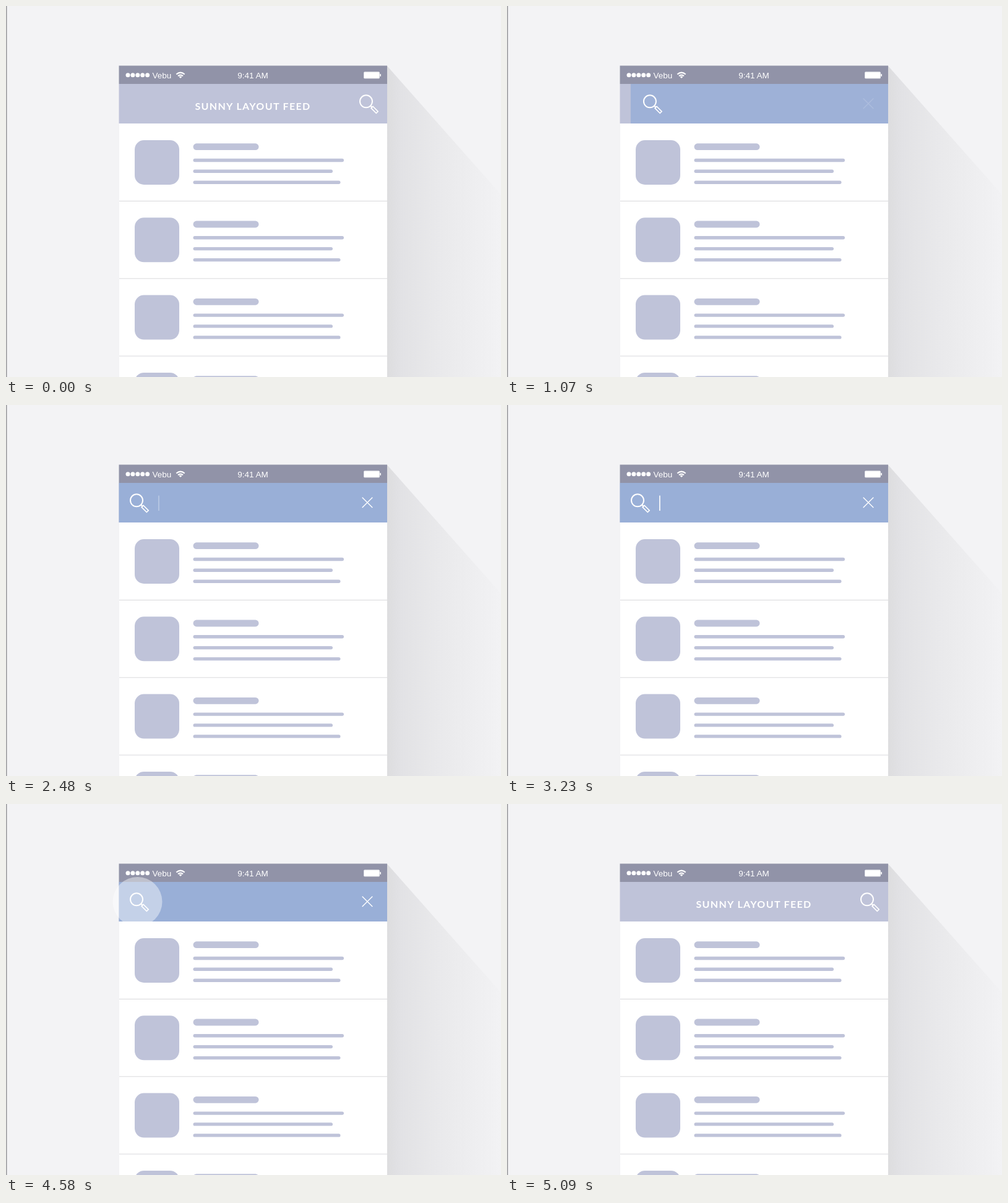
An HTML page that plays this animation: 800 px wide and 600 px high, repeating every 6.38 s.

```html
<!DOCTYPE html>
<html lang="en">
<head>
<meta charset="utf-8">
<title>Expanding search bar</title>
<style>
  html, body { margin: 0; width: 100%; height: 100%; overflow: hidden; background: #f3f3f5; }
  svg { display: block; width: 800px; height: 600px; }
  .status { font: 13.5px "Liberation Sans", Arial, sans-serif; }
  #title { font: bold 16px Lato, sans-serif; letter-spacing: 1.35px; }
</style>
</head>
<body>
<svg viewBox="0 0 800 600">
  <defs>
    <linearGradient id="shade">
      <stop offset="0" stop-color="#dddddf"/>
      <stop offset=".12" stop-color="#e2e2e5"/>
      <stop offset=".5" stop-color="#eaeaec"/>
      <stop offset="1" stop-color="#f2f2f4"/>
    </linearGradient>
    <g id="row">
      <rect x="208" y="217" width="72" height="72" rx="15"/>
      <rect x="302.5" y="222.3" width="106" height="10.8" rx="5.4"/>
      <rect x="302.5" y="246.8" width="243.5" height="5.4" rx="2.7"/>
      <rect x="302.5" y="264.6" width="225.5" height="5.4" rx="2.7"/>
      <rect x="302.5" y="282.6" width="238" height="5.4" rx="2.7"/>
      <rect x="183" y="315" width="433" height="1" fill="#d9d9dc"/>
    </g>
  </defs>

  <rect width="800" height="600" fill="#f3f3f5"/>
  <path d="M616 97L800 305V600H616Z" fill="url(#shade)"/>
  <rect width="1.5" height="600" fill="#98989b"/>

  <rect x="183" y="97" width="433" height="503" fill="#fff"/>
  <g id="list" fill="#bfc3d9"></g>

  <rect x="182.5" y="96.5" width="433.5" height="29.5" fill="#9193a8"/>
  <g class="status" fill="#fff">
    <g id="dots"></g>
    <text x="236.5" y="117">Vebu</text>
    <text x="399" y="117" text-anchor="middle">9:41 AM</text>
    <g fill="none" stroke="#fff" stroke-width="2">
      <path d="M275.3 110.6Q282 104.6 288.7 110.6M278 113.3Q282 109.7 286 113.3"/>
    </g>
    <path d="M279.6 114.5Q282 112.6 284.4 114.5L282 117Z"/>
    <rect x="578.5" y="106.8" width="25" height="10.2" rx="1" stroke="#e3e4ea"/>
    <rect x="604.3" y="109.8" width="1.7" height="4.2" rx=".8"/>
  </g>

  <rect x="182.5" y="126" width="433.5" height="64" fill="#bfc3d9"/>
  <rect id="bar" y="126" height="64" fill="#99afd7"/>
  <circle id="touch" fill="#fff"/>
  <text id="title" x="399" y="167.8" text-anchor="middle" fill="#fff">SUNNY LAYOUT FEED</text>
  <g id="lens" fill="none" stroke="#fff" stroke-width="2">
    <circle cx="11" cy="154.3" r="10"/>
    <path d="M18 161.3l3 3"/>
    <rect x="0" y="-2" width="11.5" height="4" stroke-width="1.7" transform="translate(20.6 163.8) rotate(45)"/>
  </g>
  <path id="cross" d="M575.7 149.5l16.6 16.6m0-16.6l-16.6 16.6" stroke="#fff" stroke-width="1.4"/>
  <rect id="cursor" x="246" y="146.5" width="1.8" height="24.5" fill="#fff"/>
</svg>
<script>
const LOOP = 6380, LEFT = 200, RIGHT = 571, EDGE = 616;
const $ = id => document.getElementById(id);
const set = (id, attrs) => { for (const k in attrs) $(id).setAttribute(k, attrs[k]); };
const ramp = (t, from, to) => Math.min(1, Math.max(0, (t - from) / (to - from)));
const smooth = p => p * p * (3 - 2 * p);
const mix = (a, b, p) => a + (b - a) * p;

$('list').innerHTML = [0, 1, 2, 3].map(i => `<use href="#row" y="${i * 125.3}"/>`).join('');
$('dots').innerHTML = [0, 1, 2, 3, 4].map(i => `<circle cx="${197 + i * 7.9}" cy="111.7" r="3.5"/>`).join('');

// The touch flies in, rests on the icon, then swells and fades.
function touch(t) {
  const first = t < 2000;
  const [start, land, release, gone] = first ? [130, 240, 710, 820] : [3880, 4010, 4600, 4750];
  const p = ramp(t, start, land), out = ramp(t, release, gone);
  const [x0, y0, x1] = first ? [860, 250, 585] : [-62, 265, 212.5];
  const fly = p * p * (3 - 2 * p);
  set('touch', {
    cx: mix(x0, x1, fly), cy: mix(y0, 158, fly), r: mix(40, 51, out),
    opacity: t < start ? 0 : 0.42 * (1 - out)
  });
}

function cursorAlpha(t) {
  const dip = t < 2700 ? ramp(t, 1340, 2700) : 1 - ramp(t, 2700, 3450);
  return ramp(t, 1220, 1340) * (1 - dip * dip) * (1 - ramp(t, 4130, 4400));
}

function draw(t) {
  const open = smooth(ramp(t, 710, 1130)) - smooth(ramp(t, 4600, 5060));
  const x = mix(RIGHT, LEFT, open), edge = Math.max(182.5, x - 20);
  set('lens', { transform: `translate(${x})` });
  set('bar', {
    x: edge, width: EDGE - edge,
    opacity: ramp(t, 710, 1130) - ramp(t, 4600, 5080)
  });
  set('title', { opacity: 1 - ramp(t, 830, 980) + ramp(t, 4800, 5090) });
  set('cross', { opacity: ramp(t, 1040, 1250) - ramp(t, 4600, 4760) });
  set('cursor', { opacity: cursorAlpha(t) });
  touch(t);
}

const begin = performance.now();
function tick() {
  draw((performance.now() - begin) % LOOP);
  requestAnimationFrame(tick);
}
tick();
</script>
</body>
</html>
```
